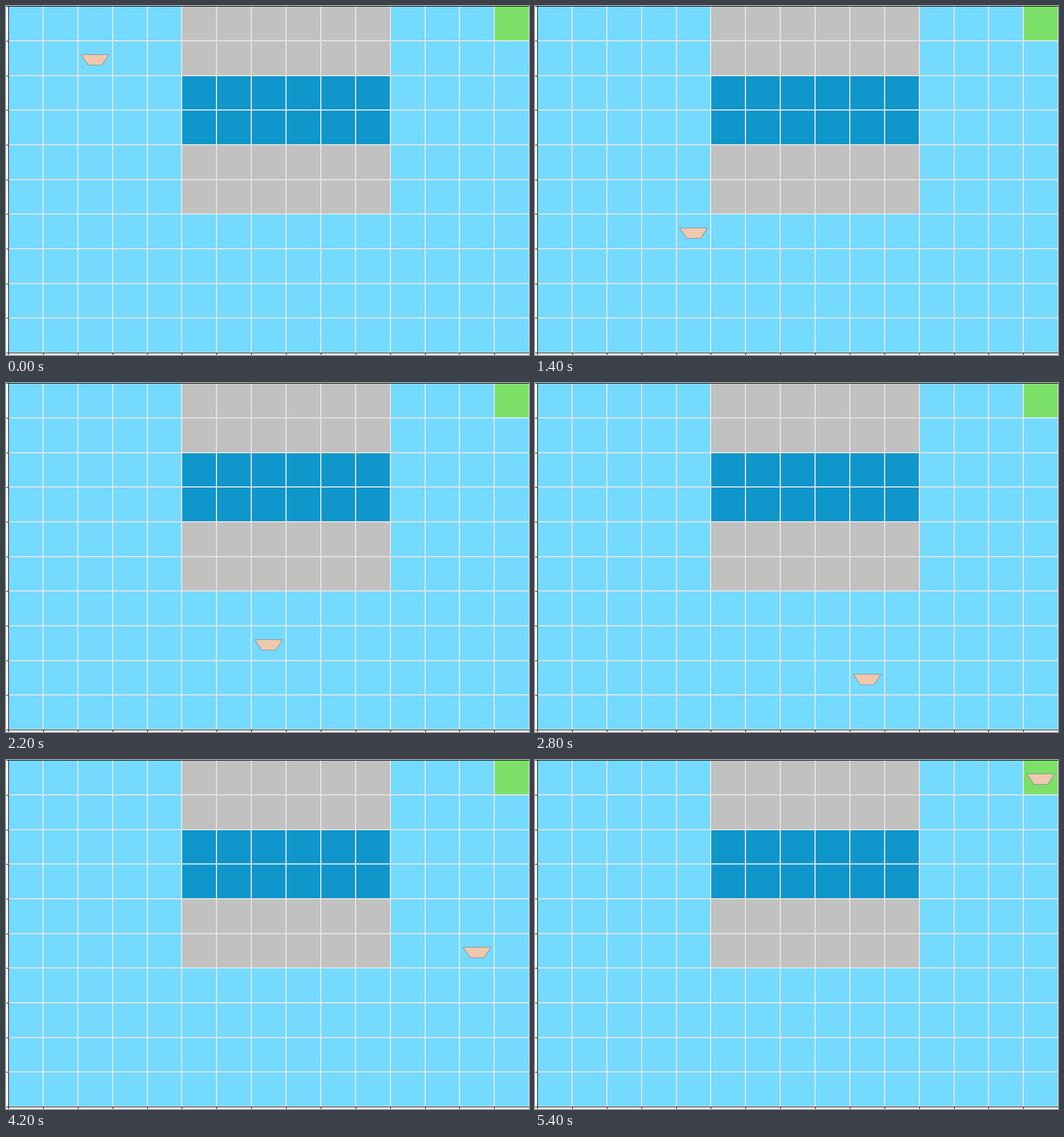
A matplotlib script for the animation above (5600 ms loop, 917 by 611 pixels).

```python
import numpy as np
import matplotlib.pyplot as plt
from matplotlib.animation import FuncAnimation
from matplotlib.colors import ListedColormap
from matplotlib.patches import Polygon

W, H, DPI = 917, 611, 64
COLS, ROWS = 15, 10
LEFT, TOP, WIDTH, HEIGHT = 4.1, 0.1, 913.05, 607.0
PX = 72 / DPI  # points per pixel

SEA, ROCK, DEEP, GOAL = range(4)
COLORS = ["#74daff", "#c1c1bf", "#0f96ca", "#7be168"]

START = (2, 1)
MOVES = "DDD" "DRD" "R" "RRDR" "R" "RDRUR" "R" "URU" "URU" "UUU"
STEPS = {"R": (1, 0), "D": (0, 1), "U": (0, -1)}
HULL = np.array([(0.1, 0.4), (0.9, 0.4), (0.7, 0.7), (0.3, 0.7)])

path = np.cumsum([START] + [STEPS[m] for m in MOVES], axis=0)

world = np.full((ROWS, COLS), SEA)
world[0:6, 5:11] = ROCK
world[2:4, 5:11] = DEEP
world[0, 14] = GOAL

fig = plt.figure(figsize=(W / DPI, H / DPI), dpi=DPI, facecolor="white")
ax = fig.add_axes([LEFT / W, 1 - (TOP + HEIGHT) / H, WIDTH / W, HEIGHT / H])
ax.imshow(world, cmap=ListedColormap(COLORS), vmin=0, vmax=3, aspect="auto",
          extent=(0, COLS, ROWS, 0), interpolation="nearest")
ax.set_xticks(range(COLS + 1))
ax.set_yticks(range(ROWS + 1))
ax.tick_params(length=4 * PX, width=PX, labelbottom=False, labelleft=False)
ax.set_axisbelow("line")
ax.grid(color="#e5e5e5", linewidth=2 * PX)
for spine in ax.spines.values():
    spine.set_linewidth(PX)

boat = Polygon(HULL + START, closed=True, facecolor="#f0c8ae",
               edgecolor="#8c8c8c", linewidth=PX, zorder=3)
ax.add_patch(boat)


def update(i):
    boat.set_xy(HULL + path[i])
    return (boat,)


anim = FuncAnimation(fig, update, frames=len(path), interval=200,
                     repeat=True, repeat_delay=0)
plt.show()
```
